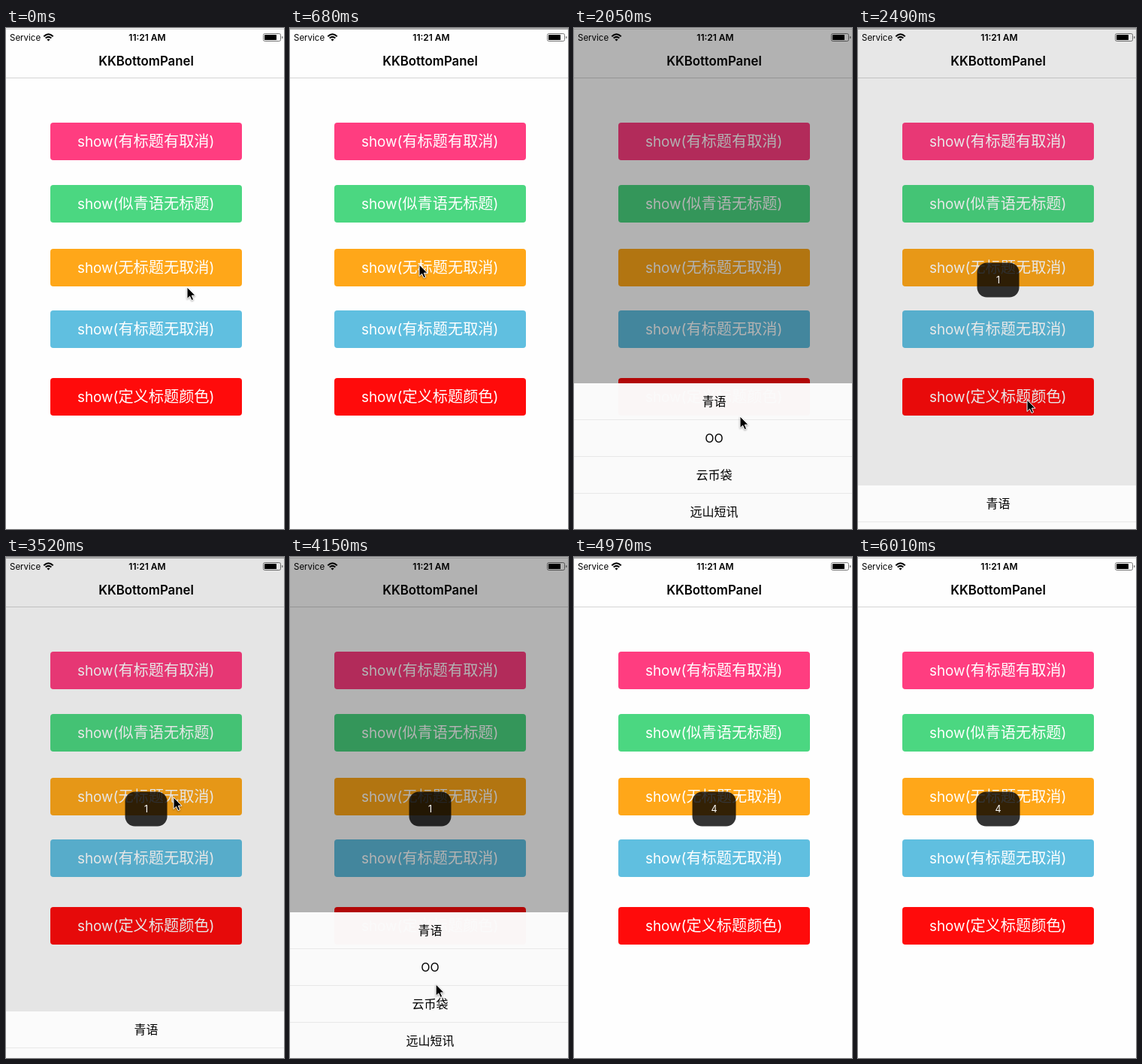
These frames come from a looping animation (370x667 px, 6.04 s). An HTML page:

```html
<!DOCTYPE html>
<html lang="zh-CN">
<head>
<meta charset="utf-8">
<style>
  html, body { margin: 0; width: 100%; height: 100%; overflow: hidden; background: #fefefe; }
  svg { display: block; width: 370px; height: 667px; }
  text { font: 16px Inter, "Noto Sans CJK SC", "Noto Sans CJK", sans-serif; text-anchor: middle; }
  .btn { font-size: 18.9px; font-weight: 400; fill: #fff; }
  .zh { font-family: "Noto Sans CJK SC", "Noto Sans CJK", sans-serif; font-size: 20.2px; font-weight: 300; }
  .bar { font-size: 12px; }
  .bold { font-weight: 600; }
  #cursor { filter: drop-shadow(0 1px 1px rgba(0, 0, 0, .35)); }
</style>
</head>
<body>
<svg viewBox="0 0 370 667">
  <rect width="370" height="667" fill="#fefefe"/>
  <text class="bar" x="5" y="17" style="text-anchor:start;font-size:11.5px">Service</text>
  <g fill="none" stroke="#000" stroke-width="2">
    <path d="M50.3 11.2Q56.5 5.4 62.7 11.2M52.7 13.6Q56.5 10.1 60.3 13.6"/>
  </g>
  <path d="M54.4 15.2Q56.5 13.6 58.6 15.2L56.5 17.6Z"/>
  <text class="bar bold" x="188" y="17">11:21 AM</text>
  <rect x="342.5" y="7.5" width="23" height="10" rx="2" fill="none" stroke="#777"/>
  <rect x="344" y="9" width="16" height="7" rx=".5"/>
  <rect x="367" y="11" width="1.5" height="3" rx=".7" fill="#777"/>
  <text class="bold" x="186.5" y="50" style="font-size:16.8px">KKBottomPanel</text>
  <rect y="66" width="370" height="1" fill="#d4d4d4"/>
  <g id="buttons"></g>
  <rect id="dim" width="370" height="667"/>
  <rect id="edge0" width="370" height="1"/>
  <rect id="edge1" y="1" width="370" height="1"/>
  <g id="sheet"></g>
  <g id="toast">
    <rect y="312.5" height="46" rx="13" fill="#000" fill-opacity=".8"/>
    <text x="186.5" y="340" fill="#fff" style="font-size:12.5px"></text>
  </g>
  <path id="cursor" d="M0 0V15.5L3.6 12.2L6 17.6L8.6 16.5L6.3 11.2H11Z" stroke="#fff" stroke-linejoin="round"/>
</svg>
<script>
const LOOP = 6040, SLIDE = 280, ROW = 49, BOTTOM = 669, MAX_DIM = 0.3;
const $ = id => document.getElementById(id);
const set = (el, attrs) => { for (const k in attrs) el.setAttribute(k, attrs[k]); };
const clamp = v => Math.max(0, Math.min(1, v));
const ease = v => { v = clamp(v); return v * v * (3 - 2 * v); };

const buttons = [
  [126, '#ff3d80', '有标题有取消'],
  [209, '#4bd781', '似青语无标题'],
  [294, '#ffa719', '无标题无取消'],
  [376, '#60bfe0', '有标题无取消'],
  [466, '#ff0b0b', '定义标题颜色']
];
$('buttons').innerHTML = buttons.map(([y, color, label]) =>
  `<rect x="59" y="${y}" width="255" height="50" rx="4" fill="${color}"/>
   <text class="btn" x="186.2" y="${y + 32}">show(<tspan class="zh">${label}</tspan>)</text>`).join('');

const rows = ['青语', 'OO', '云币袋', '远山短讯'];
const HEIGHT = rows.length * ROW;
$('sheet').innerHTML = `<rect width="370" height="${HEIGHT}" fill="#fcfcfc" fill-opacity=".975"/>` +
  rows.map((label, i) =>
    `<text x="186.5" y="${i * ROW + 30}">${label}</text>
     <rect y="${i * ROW + 48}" width="370" height="1" fill="#e8e8e8"/>`).join('');

const visits = [[818, 2314], [3414, 4428]];  // sheet opens, closes
const toasts = [
  { text: '1', width: 56, from: 2320, to: 4200 },
  { text: '4', width: 58, from: 4435, to: LOOP }
];
const path = [  // time, x, y
  [30, 241, 345], [290, 204, 267], [570, 172, 315], [1060, 172, 315],
  [1240, 180, 315], [1610, 259, 553], [1850, 259, 553], [2050, 221, 517],
  [2270, 225, 495], [2600, 225, 495], [3060, 224, 340], [3300, 223, 320],
  [3740, 223, 320], [4330, 186, 639], [4600, 186, 639], [4970, 320, 690]
];

function cursorAt(t) {
  const i = path.findIndex(p => p[0] > t);
  if (i === 0) return path[0].slice(1);
  if (i < 0) return path[path.length - 1].slice(1);
  const [t0, x0, y0] = path[i - 1], [t1, x1, y1] = path[i];
  const p = ease((t - t0) / (t1 - t0));
  return [x0 + (x1 - x0) * p, y0 + (y1 - y0) * p];
}

function draw(t) {
  const open = visits.reduce((sum, [a, b]) =>
    sum + ease((t - a) / SLIDE) - ease((t - b) / SLIDE), 0);
  set($('sheet'), {
    transform: `translate(0 ${Math.round(BOTTOM - open * HEIGHT)})`,
    visibility: open > 0.001 ? 'visible' : 'hidden'
  });
  set($('dim'), { 'fill-opacity': MAX_DIM * open });

  const active = t >= 680 && t < 6010;
  set($('edge0'), { fill: active ? '#b4b4b4' : '#f4f4f4' });
  set($('edge1'), { fill: active ? '#989898' : '#d6d6d6' });

  const toast = toasts.find(o => t >= o.from && t < o.to + 180);
  set($('toast'), {
    opacity: toast ? clamp((t - toast.from) / 100) * clamp(1 - (t - toast.to) / 180) : 0
  });
  if (toast) {
    set($('toast').children[0], { x: 186.5 - toast.width / 2, width: toast.width });
    $('toast').children[1].textContent = toast.text;
  }
  set($('cursor'), { transform: `translate(${cursorAt(t)})` });
}

function tick() {
  draw(performance.now() % LOOP);
  requestAnimationFrame(tick);
}
tick();
</script>
</body>
</html>
```
